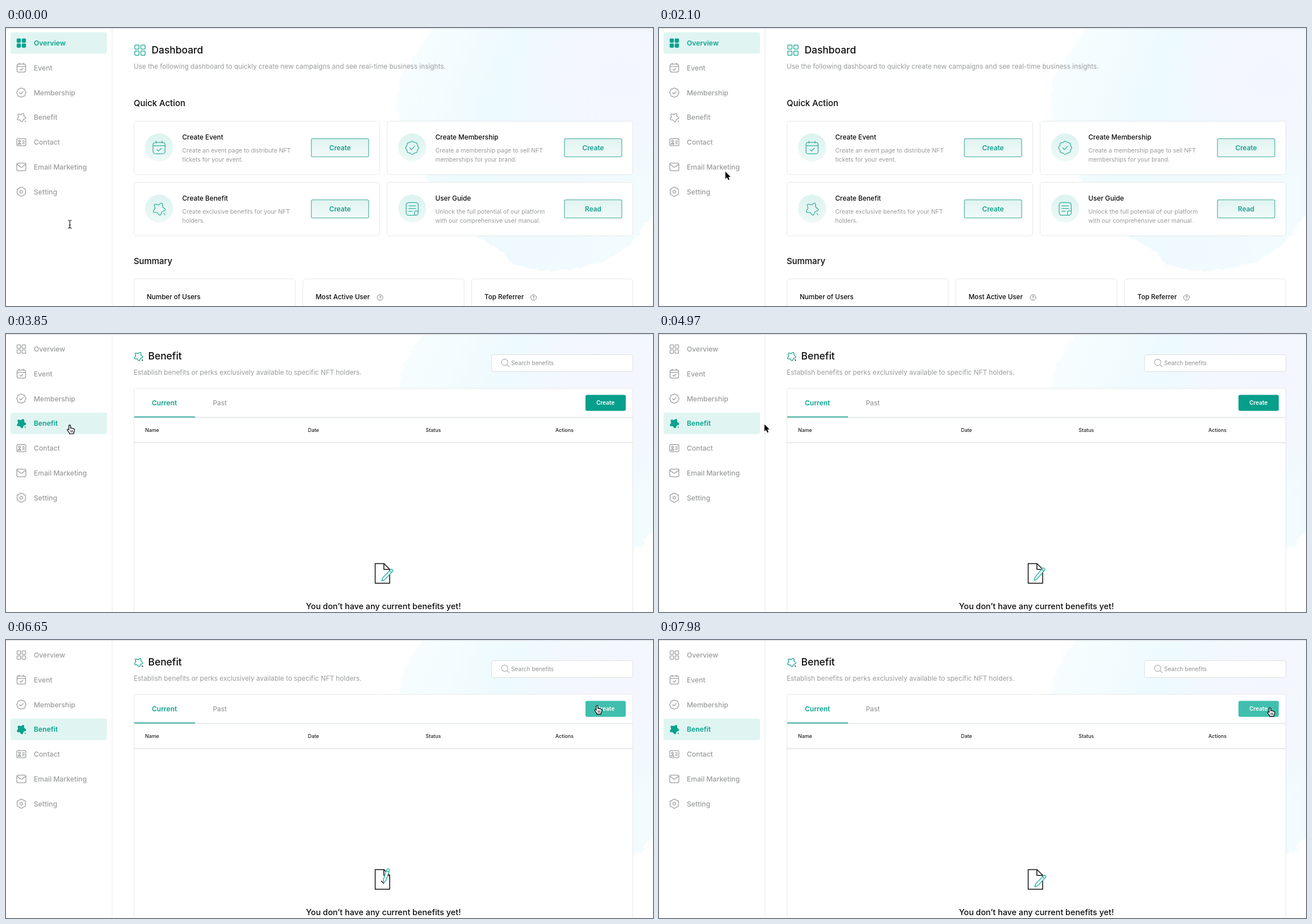
Animation, 1140 px wide and 491 px high, one loop 8 s. Source, as an HTML page with a canvas:

```html
<!DOCTYPE html>
<html lang="en">
<head>
<meta charset="utf-8">
<title>Dashboard</title>
<style>
html, body { margin: 0; width: 100%; height: 100%; overflow: hidden; background: #fff; }
canvas { display: block; width: 1140px; height: 491px; }
</style>
</head>
<body>
<canvas id="stage"></canvas>
<script>
const W = 1140, H = 491, LOOP = 8000, STEP = 70;
const TEAL = '#0ba28e', GRAY = '#999b9b', INK = '#0c0c0c', LINE = '#e4e8e8';
const canvas = document.getElementById('stage');
const ctx = canvas.getContext('2d');
const ratio = window.devicePixelRatio || 1;
canvas.width = W * ratio;
canvas.height = H * ratio;

function text(str, x, y, size, color, weight = 400, align = 'left') {
  ctx.font = `${weight} ${size}px Inter, "Open Sans", sans-serif`;
  ctx.textAlign = align;
  ctx.fillStyle = color;
  ctx.fillText(str, x, y);
}

function box(x, y, w, h, r, fill, stroke, width = 1) {
  ctx.beginPath();
  ctx.roundRect(x, y, w, h, r);
  if (fill) { ctx.fillStyle = fill; ctx.fill(); }
  if (stroke) { ctx.strokeStyle = stroke; ctx.lineWidth = width; ctx.stroke(); }
}

function bar(x, y, w, h, color) {
  ctx.fillStyle = color;
  ctx.fillRect(x, y, w, h);
}

function fade(y0, y1, top, bottom) {
  const g = ctx.createLinearGradient(0, y0, 0, y1);
  g.addColorStop(0, top);
  g.addColorStop(1, bottom);
  return g;
}

// Smooth monotone interpolation through rows of [time, ...values]
function along(keys, t) {
  const last = keys.length - 1;
  if (t <= keys[0][0]) return keys[0].slice(1);
  if (t >= keys[last][0]) return keys[last].slice(1);
  let i = 0;
  while (t >= keys[i + 1][0]) i++;
  const slope = (k, c) => (keys[k + 1][c] - keys[k][c]) / (keys[k + 1][0] - keys[k][0]);
  const tangent = (k, c) => {
    if (k === 0 || k === last) return 0;
    const a = slope(k - 1, c), b = slope(k, c);
    return a * b <= 0 ? 0 : 2 * a * b / (a + b);
  };
  const span = keys[i + 1][0] - keys[i][0], u = (t - keys[i][0]) / span;
  const s = u * u * (3 - 2 * u);
  return keys[i].slice(1).map((v, n) => {
    const c = n + 1;
    return v + (keys[i + 1][c] - v) * s
      + span * u * (1 - u) * ((1 - u) * tangent(i, c) - u * tangent(i + 1, c));
  });
}

// Rounded star, symmetric about the falling diagonal
function starPath() {
  const p = new Path2D();
  const at = (k, r) => {
    const a = -0.75 * Math.PI + k * Math.PI / 5;
    return [Math.cos(a) * r, Math.sin(a) * r];
  };
  for (let k = 0; k < 10; k += 2) {
    const a = at(k - 0.28, 8.6), b = at(k + 0.28, 8.6);
    k ? p.lineTo(...a) : p.moveTo(...a);
    p.quadraticCurveTo(...at(k, 10.6), ...b);
    p.lineTo(...at(k + 1, 6));
  }
  p.closePath();
  return p;
}

function badgePath() {
  const p = new Path2D();
  for (let k = 0; k <= 96; k++) {
    const a = k * Math.PI / 48, r = 9.2 + 0.55 * Math.cos(a * 8);
    p.lineTo(Math.cos(a) * r, Math.sin(a) * r);
  }
  p.closePath();
  p.addPath(new Path2D('M-3.6 .2L-1 2.8L3.8 -2.4'));
  return p;
}

function gridPath() {
  const p = new Path2D();
  for (const x of [-9, 1.6]) for (const y of [-9, 1.6]) p.roundRect(x, y, 7.4, 7.4, 1.3);
  return p;
}

function framed(x, y, w, h, r, details) {
  const p = new Path2D(details);
  p.roundRect(x, y, w, h, r);
  return p;
}

const icons = {
  grid: gridPath(),
  event: framed(-9, -8, 18, 17, 3.5, 'M-9 -3H9M-4.5 -10V-7M4.5 -10V-7M-3 3L-.8 5L3.4 .8'),
  badge: badgePath(),
  star: starPath(),
  contact: framed(-9.5, -7.5, 19, 15, 2.5,
    'M-5.8 -2.2a2 2 0 1 0 4 0a2 2 0 1 0 -4 0M-7 4.2Q-3.8 -.6 -.6 4.2ZM2.5 -3H6.5M2.5 0H6.5M2.5 3H6.5'),
  mail: framed(-9.5, -8, 19, 16, 2.5, 'M-9 -5.5L-1.2 .4Q0 1.2 1.2 .4L9 -5.5'),
  gear: new Path2D('M0 -10L8.7 -5V5L0 10L-8.7 5V-5ZM-3 0a3 3 0 1 0 6 0a3 3 0 1 0 -6 0'),
  note: framed(-9, -9.5, 18, 19, 3.5, 'M-5 -4.5H5M-5 -.5H5M-5 3.5H0M9 3H5Q3.5 3 3.5 4.5V9')
};

function icon(name, x, y, scale, color, filled, dot = color) {
  ctx.save();
  ctx.translate(x, y);
  ctx.scale(scale, scale);
  ctx.lineWidth = 1.25 / scale;
  ctx.lineJoin = ctx.lineCap = 'round';
  ctx.strokeStyle = ctx.fillStyle = color;
  if (filled) ctx.fill(icons[name]);
  ctx.stroke(icons[name]);
  if (name === 'star') {
    ctx.strokeStyle = dot;
    ctx.stroke(new Path2D('M7.2 7.2L8.8 8.8'));
  }
  ctx.restore();
}

// Watercolour wash with a ragged brush edge
function wash(edge) {
  let seed = 7;
  const rand = () => (seed = seed * 16807 % 2147483647) / 2147483647 - 0.5;
  ctx.beginPath();
  edge.forEach(([x, y], i) => {
    const [px, py] = edge[i - 1] || [x, y];
    const n = Math.max(1, Math.round(Math.hypot(x - px, y - py) / 4));
    for (let k = 1; k <= n; k++) {
      ctx.lineTo(px + (x - px) * k / n + rand() * 7, py + (y - py) * k / n + rand() * 5);
    }
  });
  ctx.lineTo(W + 10, -10);
  ctx.closePath();
  const base = ctx.createLinearGradient(690, 130, 1120, 290);
  base.addColorStop(0, '#f7fdff');
  base.addColorStop(0.35, '#edfafe');
  base.addColorStop(0.7, '#f0fafe');
  base.addColorStop(1, '#f2fbfe');
  ctx.fillStyle = base;
  ctx.fill();
  const tint = ctx.createRadialGradient(1080, 90, 30, 1080, 90, 190);
  tint.addColorStop(0, '#f4f6fe');
  tint.addColorStop(0.5, '#f3f7fe');
  tint.addColorStop(1, 'rgba(241,249,254,0)');
  ctx.fillStyle = tint;
  ctx.fill();
}

const menu = [
  ['Overview', 'grid'], ['Event', 'event'], ['Membership', 'badge'], ['Benefit', 'star'],
  ['Contact', 'contact'], ['Email Marketing', 'mail'], ['Setting', 'gear']
];

function sidebar(active) {
  bar(0, 0, 187, H, '#fff');
  bar(186.5, 0, 1, H, '#e6e9e9');
  menu.forEach(([label, name], i) => {
    const y = 26.6 + i * 43.75, on = i === active;
    if (on) box(8, y - 19, 170, 38, 4, '#e0f5f2');
    icon(name, 27, y, 0.84, on ? TEAL : GRAY, on);
    text(label, 49, y + 4.5, 12.2, on ? TEAL : GRAY, on ? 600 : 500);
  });
}

function actionCard(x, y, name, title, lines, action) {
  box(x + 0.5, y + 0.5, 433, 94.5, 5, '#fff', LINE);
  ctx.beginPath();
  ctx.arc(x + 44.7, y + 47, 24.7, 0, 7);
  ctx.fillStyle = fade(y + 22, y + 72, '#dcf3ef', '#eef9f7');
  ctx.fill();
  icon(name, x + 44.7, y + 47.5, 1.18, '#2fae9d');
  text(title, x + 85.5, y + 33.2, 11.75, INK, 500);
  lines.forEach((line, i) => text(line, x + 85.5, y + 56 + i * 15.8, 10.45, GRAY));
  box(x + 313, y + 31.5, 101, 32, 2.5, fade(y + 31, y + 63, '#e0f3f0', '#f1faf9'), '#3fab9d', 1.1);
  text(action, x + 363.5, y + 51.7, 11.8, '#14a18e', 600, 'center');
}

function help(x) {
  ctx.beginPath();
  ctx.arc(x, 476, 5, 0, 7);
  ctx.strokeStyle = '#777';
  ctx.lineWidth = 0.9;
  ctx.stroke();
  text('?', x, 479, 8, '#666', 500, 'center');
}

function dashboard() {
  wash([[755, -5], [722, 45], [695, 85], [688, 125], [692, 165], [715, 220], [740, 265],
    [790, 320], [835, 372], [868, 390], [895, 418], [955, 430], [1010, 425], [1060, 410],
    [1100, 380], [1125, 350], [1150, 310]]);
  icon('grid', 236, 39, 1, TEAL);
  text('Dashboard', 256.5, 45.4, 17.4, INK, 500);
  text('Use the following dashboard to quickly create new campaigns and see real-time business insights.',
    225, 71.5, 11.8, GRAY);
  text('Quick Action', 225, 138.4, 14.9, INK, 500);
  actionCard(225, 164, 'event', 'Create Event',
    ['Create an event page to distribute NFT', 'tickets for your event.'], 'Create');
  actionCard(671, 164, 'badge', 'Create Membership',
    ['Create a membership page to sell NFT', 'memberships for your brand.'], 'Create');
  actionCard(225, 272, 'star', 'Create Benefit',
    ['Create exclusive benefits for your NFT', 'holders.'], 'Create');
  actionCard(671, 272, 'note', 'User Guide',
    ['Unlock the full potential of our platform', 'with our comprehensive user manual.'], 'Read');
  text('Summary', 225, 417, 14.9, INK, 500);
  ['Number of Users', 'Most Active User', 'Top Referrer'].forEach((title, i) => {
    const x = 225.5 + i * 297.5;
    box(x, 443, 284, 80, 5, '#fff', LINE);
    text(title, x + 22.5, 479, 11.65, INK, 500);
  });
  help(659);
  help(929.5);
}

// Pen pose: tip x, tip y, top x, top y, length of the written mark
const penKeys = [
  [4830, 662, 436, 681, 416, 0],
  [5250, 658, 432, 670, 406, 0],
  [5670, 657, 431, 657, 405, 1],
  [6440, 658, 430, 664, 404, 1],
  [6650, 665.5, 429, 674, 404, 1],
  [7280, 664, 432, 680, 408, 0.5],
  [7630, 662, 436, 681, 416, 0]
];

function notePad(t) {
  ctx.lineJoin = ctx.lineCap = 'round';
  ctx.strokeStyle = '#111';
  ctx.lineWidth = 1.5;
  ctx.stroke(new Path2D('M650.5 405.5H666L676 415.5V440.3H650.5ZM665.8 405.5V415.7H676'));
  const [x, y, tx, ty, mark] = along(penKeys, t);
  if (mark > 0.05) {
    ctx.beginPath();
    ctx.moveTo(x - 4 * mark, y - 3 * mark);
    ctx.lineTo(x, y + 1);
    ctx.stroke();
  }
  const len = Math.hypot(tx - x, ty - y);
  ctx.save();
  ctx.translate(x, y);
  ctx.rotate(Math.atan2(ty - y, tx - x));
  const pen = new Path2D(`M0 0L5 -2.4H${len - 1.5}Q${len + 1} 0 ${len - 1.5} 2.4H5ZM${len - 5} -2.4V2.4`);
  ctx.fillStyle = '#fff';
  ctx.fill(pen);
  ctx.strokeStyle = '#2fb0a2';
  ctx.lineWidth = 1.4;
  ctx.stroke(pen);
  ctx.restore();
}

function benefit(t) {
  wash([[738, -5], [712, 30], [698, 60], [692, 96], [900, 300], [1108, 380], [1122, 375],
    [1127, 358], [1150, 340]]);
  icon('star', 233.5, 39.5, 0.82, TEAL, false, INK);
  text('Benefit', 250.5, 45.4, 17.4, INK, 500);
  text('Establish benefits or perks exclusively available to specific NFT holders.', 225, 71.5, 11.8, GRAY);

  box(855.5, 36.5, 249, 30, 3, '#fff', '#dcdfdf');
  ctx.strokeStyle = '#aaa';
  ctx.lineWidth = 1.1;
  ctx.stroke(new Path2D('M873 50a5.6 5.6 0 1 0 11.2 0a5.6 5.6 0 1 0 -11.2 0M882.8 54L886.5 57.8'));
  text('Search benefits', 890, 55.3, 10.15, '#8f9191');

  box(225.5, 96, 879, 420, 4, '#fff', LINE);
  bar(226, 146.6, 878, 1.8, LINE);
  bar(226, 190.8, 878, 1.8, LINE);
  bar(226, 145.6, 107, 1.8, '#2aa898');
  text('Current', 257, 125.5, 12, TEAL, 600);
  text('Past', 364.5, 125.5, 11.8, GRAY, 500);
  box(1021, 107.5, 71, 28.3, 3, t >= 6510 ? '#40bfae' : '#069f8b');
  text('Create', 1056.3, 125.4, 10, '#fff', 600, 'center');
  [['Name', 245], ['Date', 532], ['Status', 739.5], ['Actions', 968]]
    .forEach(([label, x]) => text(label, x, 172.8, 8.85, '#222', 500));
  notePad(t);
  text('You don’t have any current benefits yet!', 665, 486, 14.35, INK, 500, 'center');
}

const cursorKeys = [
  [1400, 110, 344], [1750, 113, 312], [2100, 117, 253], [2170, 117, 241], [2520, 115, 187],
  [2870, 113.5, 162], [3010, 113.5, 161], [3080, 113, 161], [3220, 112.3, 160.3],
  [4340, 112.3, 160.3], [4410, 112.6, 160], [4760, 112.6, 160], [5180, 320, 156],
  [5600, 617, 150], [5670, 658, 149], [6090, 885, 128], [6440, 1019, 108],
  [6650, 1041.5, 115], [7280, 1074, 118], [7630, 1076.5, 119]
];
const arrow = new Path2D('M0 0V12.6L2.9 9.9L5 14.8L7.2 13.8L5.2 9.1H9Z');
const hand = new Path2D('M-1.4 8.5V1.4Q-1.4 0 0 0T1.4 1.4V5.6Q3 4.4 4 6Q5.4 5 6.2 6.7'
  + 'Q8.4 6.2 8.4 8.4Q8.4 12 6.8 13.4V15.3H-.4V13.9Q-2 12.4 -4.2 8.9Q-4.4 7 -2.6 7.4Z');
const knuckles = new Path2D('M1.5 9V12.6M3.4 9V12.6M5.3 9V12.6');

function cursor(t) {
  ctx.lineJoin = ctx.lineCap = 'round';
  if (t < 350) {
    ctx.strokeStyle = '#222';
    ctx.lineWidth = 1.2;
    ctx.stroke(new Path2D('M109.8 339.5Q112.5 339.5 112.5 341.5Q112.5 339.5 115.2 339.5'
      + 'M112.5 341V352M109.8 353.5Q112.5 353.5 112.5 351.5Q112.5 353.5 115.2 353.5M111 348H114'));
    return;
  }
  if (t < 1400) return;
  const [x, y] = along(cursorKeys, t);
  const pointing = (t >= 2730 && t < 4970) || t >= 6510;
  ctx.save();
  ctx.translate(x, y + (pointing ? 0.6 : 0.8));
  ctx.fillStyle = pointing ? '#fff' : '#000';
  ctx.strokeStyle = pointing ? '#111' : '#fff';
  ctx.lineWidth = pointing ? 1.1 : 1.8;
  const shape = pointing ? hand : arrow;
  ctx.stroke(shape);
  ctx.fill(shape);
  if (pointing) {
    ctx.stroke(shape);
    ctx.lineWidth = 0.8;
    ctx.stroke(knuckles);
  }
  ctx.restore();
}

function draw(t) {
  ctx.setTransform(ratio, 0, 0, ratio, 0, 0);
  bar(0, 0, W, H, '#fff');
  const opened = t >= 3780;
  opened ? benefit(t) : dashboard();
  sidebar(opened ? 3 : 0);
  bar(0, 0, W, 1.4, '#dfe2e3');
  if (t >= 3570 && t < 3640) {
    ctx.beginPath();
    ctx.arc(112, 160, 28, 0, 7);
    ctx.fillStyle = 'rgba(120,120,120,.18)';
    ctx.fill();
  }
  cursor(t);
}

function frame(now) {
  draw(Math.floor(now % LOOP / STEP) * STEP);
  requestAnimationFrame(frame);
}
requestAnimationFrame(frame);
</script>
</body>
</html>
```
